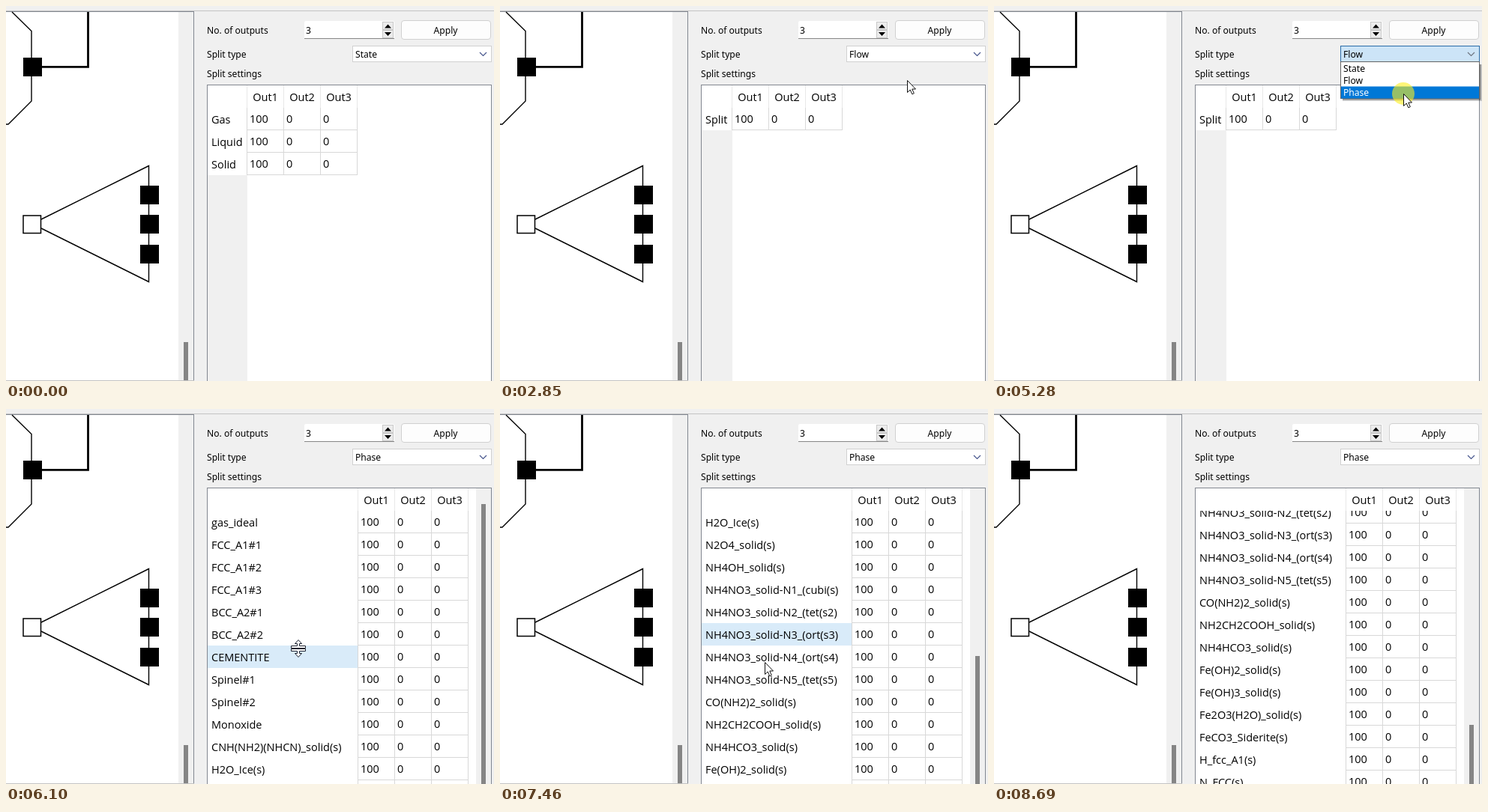
These frames come from a looping animation (651x501 px, 9360 ms). An HTML page:

```html
<!DOCTYPE html>
<html lang="en">
<head>
<meta charset="utf-8">
<title>Splitter settings</title>
<style>
  html, body { margin: 0; width: 100%; height: 100%; overflow: hidden; background: #f0f0f0; }
  svg { display: block; width: 651px; height: 501px; }
  text { white-space: pre; }
  .ui { font: 12.1px "Noto Sans", "Open Sans", sans-serif; }
  .grid { font: 14.5px "Open Sans", "Noto Sans", sans-serif; }
</style>
</head>
<body>
<svg viewBox="0 0 651 501" xmlns="http://www.w3.org/2000/svg">
  <defs><clipPath id="rows"><rect x="269" y="136" width="358" height="365"/></clipPath></defs>
  <g id="base"></g>
  <g id="table" class="grid"></g>
  <g id="combo" class="ui"></g>
  <g id="popup" class="ui"></g>
  <circle id="halo" r="15" fill="#fbee1c" fill-opacity=".6"/>
  <g id="arrow"><path d="M.5 .5V16.5L4.2 13L6.8 18.8L9.3 17.7L6.8 12H11.5Z" fill="#fff" stroke="#111" stroke-width="1"/></g>
  <g id="resize" fill="#fff" stroke="#1c2230" stroke-width="1"></g>
</svg>
<script>
const LOOP = 9360, STEP = 70, ROW = 30, COL = 49, HEAD = 136;
const TYPES = ['State', 'Flow', 'Phase'];
const PHASES = ['gas_ideal', 'FCC_A1#1', 'FCC_A1#2', 'FCC_A1#3', 'BCC_A2#1', 'BCC_A2#2',
  'CEMENTITE', 'Spinel#1', 'Spinel#2', 'Monoxide', 'CNH(NH2)(NHCN)_solid(s)', 'H2O_Ice(s)',
  'N2O4_solid(s)', 'NH4OH_solid(s)', 'NH4NO3_solid-N1_(cubi(s)', 'NH4NO3_solid-N2_(tet(s2)',
  'NH4NO3_solid-N3_(ort(s3)', 'NH4NO3_solid-N4_(ort(s4)', 'NH4NO3_solid-N5_(tet(s5)',
  'CO(NH2)2_solid(s)', 'NH2CH2COOH_solid(s)', 'NH4HCO3_solid(s)', 'Fe(OH)2_solid(s)',
  'Fe(OH)3_solid(s)', 'Fe2O3(H2O)_solid(s)', 'FeCO3_Siderite(s)', 'H_fcc_A1(s)', 'N_FCC(s)'];
const TABLES = [
  { labels: ['Gas', 'Liquid', 'Solid'], left: 321 },
  { labels: ['Split'], left: 309 },
  { labels: PHASES, left: 469 }
];

// Pointer moves: start, steps, from x, y, to x, y
const MOVES = [
  [320, 14, 379, 479, 546, 70],
  [1290, 7, 546, 70, 543, 59],
  [1780, 2, 543, 59, 543, 64],
  [2240, 5, 543, 64, 543, 99],
  [3780, 4, 543, 99, 540, 71],
  [4460, 7, 540, 71, 546, 117],
  [5680, 7, 546, 117, 390, 320],
  [6170, 2, 390, 320, 353, 338],
  [8140, 8, 353, 338, 342, 503]
];
const POPUPS = [[1990, 2850], [4320, 5480]];
const CLICKS = [[1920, 2110], [2720, 2850], [4320, 4460], [5280, 5480]];
const SCROLLS = [[6240, 6], [6990, 4], [7460, 3], [7930, 3]];
const LAST_STEP = 16, LAST_OFFSET = 463;

const $ = id => document.getElementById(id);
const rect = (x, y, w, h, fill, more = '') =>
  `<rect x="${x}" y="${y}" width="${w}" height="${h}" fill="${fill}" ${more}/>`;
const path = (d, width = 1, fill = 'none', color = '#000') =>
  `<path d="${d}" fill="${fill}" stroke="${color}" stroke-width="${width}"/>`;
const text = (x, y, s, more = '') => `<text x="${x}" y="${y}" ${more}>${s}</text>`;
const within = (t, spans) => spans.some(([a, b]) => t >= a && t < b);

const cache = {};
function fill(id, html) {
  if (cache[id] !== html) $(id).innerHTML = cache[id] = html;
}

function drawBase() {
  const square = (x, y) => rect(x, y, 25, 25, '#000');
  const canvas =
    rect(0, 6, 651, 1, '#c4c4c4') + rect(0, 7, 251, 1, '#828790') +
    rect(0, 8, 230, 493, '#fff') + rect(250, 7, 1, 494, '#828790') +
    rect(237, 449, 6, 52, '#858585') + rect(0, 500, 251, 1, '#c4c4c4') +
    path('M8 8L34 33.5V127L3 158H0', 1.4) +
    path('M47 81.3H109.5V8', 2.8) +
    path('M47 285L190.5 213.5V368.5L47 297', 1.4) +
    square(23, 69) + [240, 279, 319].map(y => square(179, y)).join('') +
    rect(23, 280, 23.5, 23.5, '#fff', 'stroke="#000" stroke-width="1.5"');
  const form =
    text(268, 37, 'No. of outputs') + text(268, 69, 'Split type') + text(268, 95, 'Split settings') +
    rect(398, 20, 120, 24, '#fff', 'rx="2"') + rect(398, 43, 120, 1, '#868686') +
    text(400, 37, '3') +
    rect(502.5, 21.5, 14, 10, '#ececec', 'stroke="#c8c8c8"') +
    rect(502.5, 32.5, 14, 10, '#ececec', 'stroke="#c8c8c8"') +
    '<path d="M505 29.5L509.5 24.5L514 29.5ZM505 35L509.5 40L514 35Z"/>' +
    rect(527.5, 19.5, 119, 25, '#fdfdfd', 'rx="3.5" stroke="#d0d0d0"') +
    text(586.5, 37, 'Apply', 'text-anchor="middle"');
  $('base').innerHTML = canvas + `<g class="ui">${form}</g>`;
  const half = 'M0 -11.5L4.5 -6.5H1.5V-3.5H9.5V-.5H-9.5V-3.5H-1.5V-6.5H-4.5Z';
  $('resize').innerHTML = `<path d="${half}"/><path d="${half}" transform="scale(1 -1)"/>`;
}

function drawTable(type, step, hoverRow, hoverCol) {
  const { labels, left } = TABLES[type];
  const offset = step >= LAST_STEP ? LAST_OFFSET : step * ROW;
  const right = left + 3 * COL;
  const bottom = HEAD + labels.length * ROW;
  let head = rect(268.5, 105.5, 379, 410, '#fff', 'stroke="#828790"');
  if (bottom < 501) head += rect(269, bottom, left - 268, 501 - bottom, '#f0f0f0');

  let body = '';
  labels.forEach((label, i) => {
    const y = HEAD + i * ROW - offset;
    if (y < HEAD - ROW || y > 501) return;
    if (i === hoverRow) body += rect(269, y, left - 269, ROW, '#d9ebf9');
    body += text(274, y + 21, label) + rect(left, y + 29, 3 * COL + 1, 1, '#d8d8d8');
    for (let c = 0; c < 3; c++) body += text(left + 4 + c * COL, y + 20, c ? 0 : 100);
  });
  for (let c = 0; c < 4; c++) {
    const x = left + c * COL;
    if (c < 3) {
      if (c === hoverCol) head += rect(x, 106, COL, ROW, '#d9ebf9');
      head += text(x + 25, 127, 'Out' + (c + 1), 'text-anchor="middle"');
    }
    head += rect(x, 106, 1, ROW, '#e8e8e8');
    body += rect(x, HEAD, 1, Math.min(bottom, 501) - HEAD, '#d8d8d8');
  }
  if (type === 2) {
    const top = Math.round(127 + step * 18.45);
    head += rect(627, 106, 20, 395, '#f0f0f0') + rect(634, top, 6, 501 - top, '#858585');
  }
  fill('table', head + `<g clip-path="url(#rows)">${body}</g>`);
}

function drawCombo(type, open, hover) {
  const back = open ? '#cce4f7' : hover ? '#e5f1fb' : '#fff';
  const edge = open ? '#2a6ca8' : hover ? '#0078d7' : '#d0d0d0';
  fill('combo', rect(462.5, 53.5, 185, 21, back, `stroke="${edge}"`) +
    text(466, 69, TYPES[type]) +
    path('M632 62L636.5 66.5L641 62', 1.2, 'none', open || hover ? '#6d7480' : '#46558c'));
}

function drawPopup(open, picked) {
  if (!open) return fill('popup', '');
  let html = rect(465, 78, 186, 49, '#000', 'opacity=".16"') +
    rect(465, 78, 184.5, 47.5, '#000', 'opacity=".35"') +
    rect(462.5, 74.5, 185, 49, '#fff', 'stroke="#646464"');
  TYPES.forEach((name, i) => {
    const y = 75 + i * 16, on = i === picked;
    if (on) html += rect(463, y + 0.5, 184, 16, '#0078d7');
    html += text(466, y + 13, name, `fill="${on ? '#fff' : '#000'}"`);
  });
  fill('popup', html);
}

function pointerAt(t) {
  let p = { x: -50, y: -50 };
  for (const [start, steps, x0, y0, x1, y1] of MOVES) {
    if (t < start) break;
    const k = Math.min(1, (Math.floor((t - start) / STEP) + 1) / steps);
    const e = k * k * (3 - 2 * k);
    p = { x: Math.round(x0 + (x1 - x0) * e), y: Math.round(y0 + (y1 - y0) * e) };
  }
  return p;
}

function scrollAt(t) {
  return SCROLLS.reduce((sum, [start, n]) =>
    sum + Math.max(0, Math.min(n, Math.floor((t - start) / STEP) + 1)), 0);
}

function place(id, visible, { x, y }) {
  $(id).setAttribute('transform', `translate(${x} ${y})`);
  $(id).setAttribute('visibility', visible ? 'visible' : 'hidden');
}

function draw(t) {
  const type = t < 2850 ? 0 : t < 5480 ? 1 : 2;
  const open = within(t, POPUPS);
  const p = pointerAt(t);
  const shown = t >= 320 && t < 8690;
  const step = scrollAt(t);
  const { left } = TABLES[type];

  const onCombo = shown && p.x >= 462 && p.x < 648 && p.y >= 53 && p.y < 75;
  const item = Math.floor((p.y - 75) / 16);
  const picked = item >= 0 && item < 3 ? item : type;

  // Row hover trails the scroll by one step.
  const onRows = shown && type === 2 && p.x >= 269 && p.x < left && p.y >= HEAD;
  const seen = scrollAt(t - STEP);
  const seenOffset = seen >= LAST_STEP ? LAST_OFFSET : seen * ROW;
  const deep = p.y - HEAD + seenOffset;
  const hoverRow = onRows ? Math.floor(deep / ROW) : -1;
  const onHead = shown && !open && p.y >= 106 && p.y < HEAD;
  const hoverCol = onHead ? Math.floor((p.x - left) / COL) : -1;
  const edge = deep % ROW;
  const sizing = onRows && (edge <= 4 || edge >= 26);

  drawTable(type, step, hoverRow, hoverCol);
  drawCombo(type, open, onCombo);
  drawPopup(open, picked);
  place('halo', within(t, CLICKS), p);
  place('arrow', shown && !sizing, p);
  place('resize', sizing, p);
}

drawBase();
const start = performance.now();
function tick() {
  draw((performance.now() - start) % LOOP);
  requestAnimationFrame(tick);
}
tick();
</script>
</body>
</html>
```
